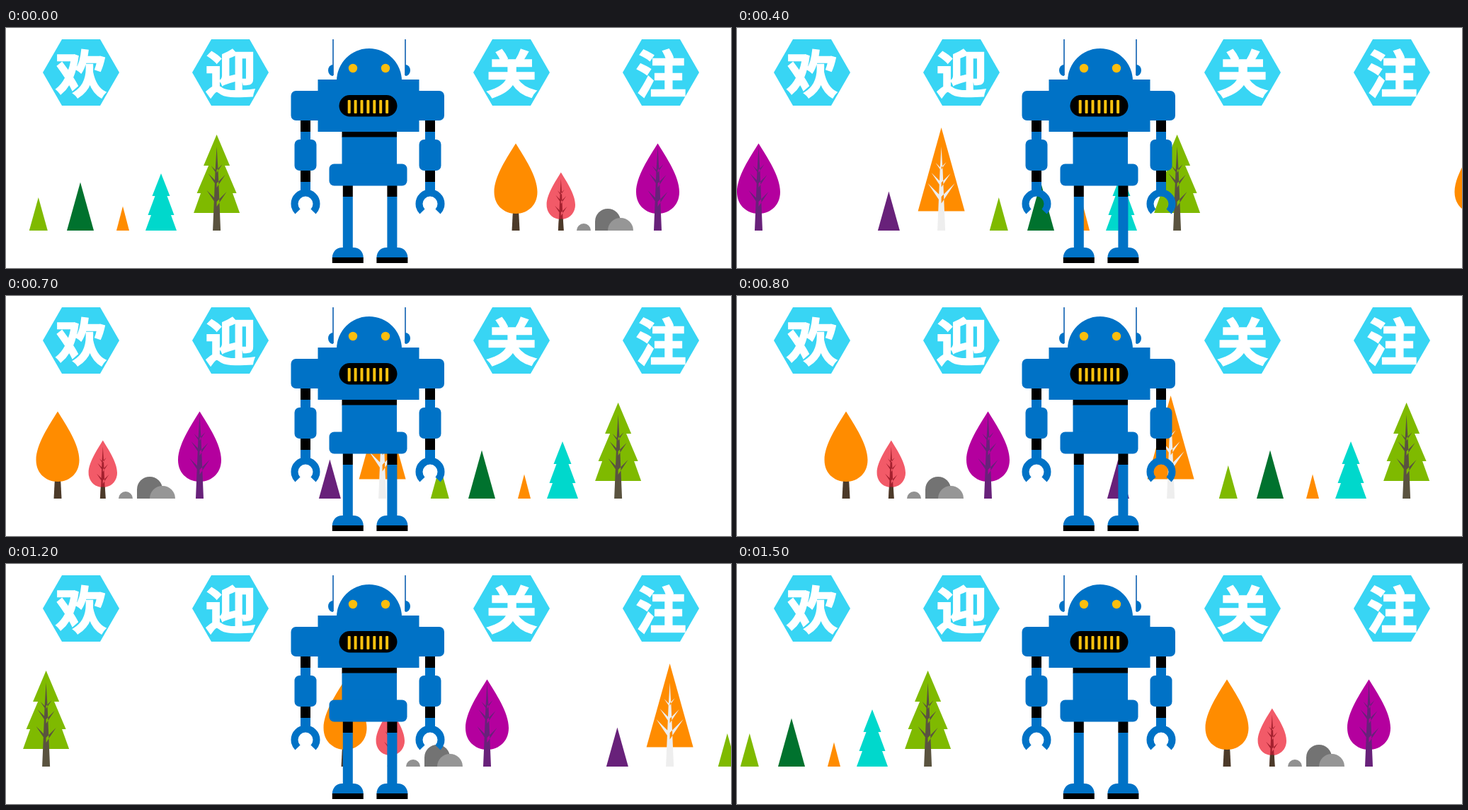
Recreate the animation shown at these times as an HTML page. Size 1024 by 340 pixels, loop 1600 ms.

```html
<!DOCTYPE html>
<html lang="zh-CN">
<head>
<meta charset="utf-8">
<style>
  html, body { margin: 0; width: 100%; height: 100%; overflow: hidden; background: #fff; }
  svg { display: block; }
  text {
    font: 900 71px "Noto Sans CJK SC", "Noto Sans CJK", sans-serif;
    fill: #fff; stroke: #fff; stroke-width: 2.4; text-anchor: middle;
  }
</style>
</head>
<body>
<svg width="1024" height="340" viewBox="0 0 1024 340">
  <g id="signs"></g>
  <g id="strip"></g>
  <use id="copy" href="#strip" x="-1214"/>
  <g id="robot" fill="#0072c6"></g>
</svg>
<script>
const GROUND = 287, STEP_MS = 100, LOOP_MS = 1600;
const SPEED = 81.12, TRAVEL = 1186; // pixels per step, resting point of the scroll
const BLUE = '#0072c6', ORANGE = '#ff8c00', GREEN = '#7fba00', PLUM = '#68217a', BARK = '#4c3a29';
const $ = id => document.getElementById(id);

const path = (x, d, fill) => `<path transform="translate(${x})" d="${d}" fill="${fill}"/>`;
const rect = (x, y, w, h, fill = BLUE, r = 0) =>
  `<rect x="${x}" y="${y}" width="${w}" height="${h}" rx="${r}" fill="${fill}"/>`;
const circle = (x, y, r, fill) => `<circle cx="${x}" cy="${y}" r="${r}" fill="${fill}"/>`;

const cone = (x, top, half, fill, base = GROUND) => path(x, `M0 ${top}L${half} ${base}H${-half}Z`, fill);

// Symmetric fir: the right-hand outline is mirrored for the left.
function fir(x, top, outline, fill) {
  const left = outline.map(([dx, y]) => [-dx, y]).reverse();
  return path(x, 'M' + [[0, top], ...outline, ...left].join('L') + 'Z', fill);
}

// Tapered trunk; each branch is a wedge from its tip down to the trunk.
const LEAFY = [[8, -94], [-8, -92], [-12, -81], [12, -79], [-14, -57], [14, -55]];
const WIDE = [[7, -97], [-8, -96], [-14, -82], [13, -81], [-19, -67], [19, -67]];
function trunk(x, fill, scale = 1, branches = LEAFY) {
  const d = 'M0 -119L2 -85L5.5 0H-5.5L-2 -85Z' + branches.map(([dx, y]) =>
    `M${dx} ${y}L0 ${y + Math.abs(dx)}V${y + Math.abs(dx) * 1.5}Z`).join('');
  return `<path transform="translate(${x} ${GROUND}) scale(${scale})" d="${d}" fill="${fill}"/>`;
}

function leaf(x, top, bottom, half, fill) {
  const h = bottom - top, y = f => top + f * h;
  const side = s => `C${s * .4 * half} ${y(.2)} ${s * half} ${y(.47)} ${s * half} ${y(.69)}`;
  return path(x, `M0 ${top}${side(1)}C${half} ${y(.88)} ${half * .55} ${bottom} 0 ${bottom}` +
    `S${-half} ${y(.88)} ${-half} ${y(.69)}C${-half} ${y(.47)} ${-.4 * half} ${y(.2)} 0 ${top}Z`, fill);
}

const stump = (x, y, half) =>
  path(x, `M${-half * .75} ${y}H${half * .75}L${half} ${GROUND}H${-half}Z`, BARK);
const rock = (x, r, fill) => path(x, `M${-r} ${GROUND}a${r} ${r} 0 0 1 ${2 * r} 0Z`, fill);

$('strip').innerHTML =
  cone(-109.6, 231.5, 15.5, PLUM) +
  cone(-35.4, 141, 33, ORANGE, 259.5) + trunk(-35.4, '#eee', 1, WIDE) +
  cone(45.8, 240, 13, GREEN) +
  cone(105, 218.5, 19, '#00722e') +
  cone(165, 252.5, 9, ORANGE) +
  fir(219, 206, [[12.5, 238], [8.5, 238], [18.5, 265], [14, 265], [22, 287]], '#00d8cc') +
  fir(297.6, 151, [[18.5, 195], [11.5, 195], [28, 234], [22.5, 234], [32.5, 262]], GREEN) +
  trunk(297.6, '#5a533f') +
  stump(720, 260, 5.5) + leaf(720, 163.5, 263, 30.5, ORANGE) +
  leaf(783.8, 204.5, 271, 20.2, '#f25a68') + trunk(783.8, '#a4202e', .62) + stump(783.8, 270.5, 4) +
  rock(816, 10, '#919191') +
  path(850, `M-18 ${GROUND}V274a18 18 0 0 1 36 0V${GROUND}Z`, '#737373') +
  rock(868, 18, '#969696') +
  leaf(920.5, 163.5, 263, 30.5, '#b4009e') + trunk(920.5, PLUM);

$('signs').innerHTML = [['欢', 106], ['迎', 317], ['关', 714], ['注', 925]].map(([char, x]) =>
  path(x, 'M-54 63L-27 16H27L54 63L27 110H-27Z', '#38d5f4') +
  `<text x="${x}" y="91">${char}</text>`).join('');

const arm = x =>
  rect(x - 7, 131, 14, 16, '#000') + rect(x - 7, 147, 14, 12) +
  rect(x - 15.5, 158, 31, 44, BLUE, 7) +
  rect(x - 7, 202, 14, 16, '#000') + rect(x - 7, 218, 14, 15) +
  `<path d="M${x - 11} 260A15.5 15.5 0 1 1 ${x + 11} 260" fill="none" stroke="${BLUE}" stroke-width="10"/>`;
const leg = x =>
  rect(x - 7, 223, 14, 16, '#000') + rect(x - 7, 239, 14, 74) +
  path(x, 'M-22 325.5C-22 317 -16 311 -8 311H8C16 311 22 317 22 325.5Z', BLUE) +
  rect(x - 22, 325, 44, 8, '#000');
const antenna = (x, sweep) =>
  rect(x - 1, 16, 2, 51, '#3d7fc0') + path(x, `M0 52a7 8 0 0 ${sweep} 0 16Z`, BLUE);

$('robot').innerHTML =
  antenna(462, 0) + antenna(564, 1) +
  circle(513, 75, 46, BLUE) + circle(490, 57, 6.2, '#fcbe0e') + circle(536, 57, 6.2, '#fcbe0e') +
  rect(402.5, 89, 45, 42, BLUE, 7) + rect(574, 89, 45, 42, BLUE, 7) +
  rect(440.5, 73, 143, 74) +
  rect(470.5, 95, 82, 30.5, '#000', 15.2) +
  Array.from({ length: 7 }, (_, i) => rect(482.7 + i * 8.9, 102, 4, 19, '#fcc20e', 1)).join('') +
  arm(423) + arm(599) +
  rect(474.5, 147, 77.5, 8, '#000') + rect(474.5, 154.5, 77.5, 40) +
  leg(482.8) + leg(545.4) +
  rect(456.5, 192.5, 110, 31, BLUE, 7);

function draw(now) {
  const step = Math.floor(now % LOOP_MS / STEP_MS);
  const shift = Math.min(Math.floor(step * SPEED), TRAVEL);
  $('strip').setAttribute('transform', `translate(${shift})`);
  requestAnimationFrame(draw);
}
draw(0);
</script>
</body>
</html>
```
